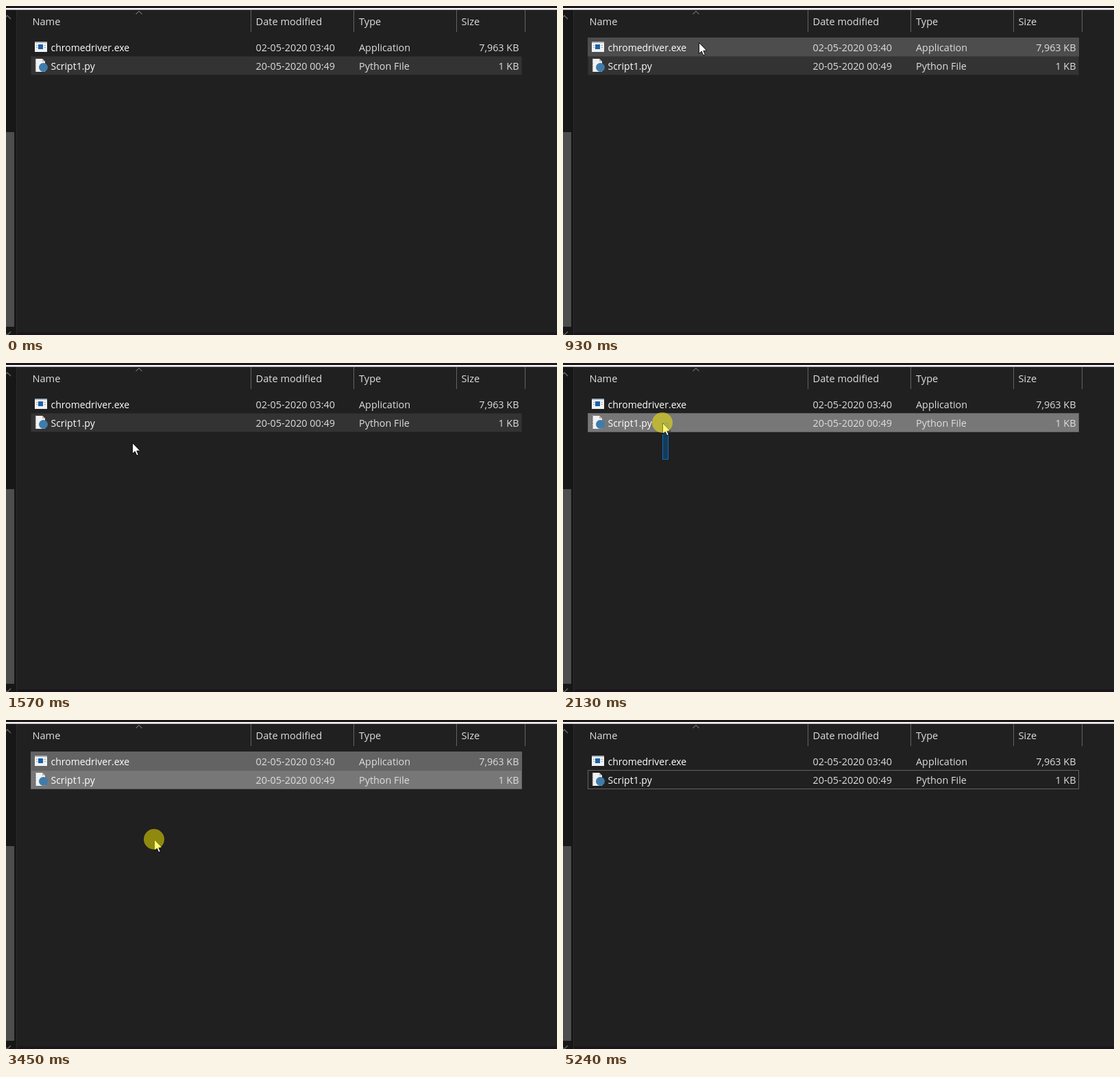
Recreate the animation shown at these times as an HTML page. Size 804 px wide and 480 px high, loop 5660 ms.

```html
<!DOCTYPE html>
<html lang="en">
<head>
<meta charset="utf-8">
<title>File list</title>
<style>
  html, body { margin: 0; width: 100%; height: 100%; overflow: hidden; background: #202020; }
  #stage { position: relative; width: 804px; height: 480px; overflow: hidden; }
  svg { display: block; overflow: visible; }
  text { font: 14.4px "Open Sans", "Noto Sans", sans-serif; fill: #dedede; }
  .head text { font-size: 14.6px; }
  .name { font-size: 14px; fill: #fff; }
  .end { text-anchor: end; }

  .row, .cell, #band, #spot { animation: 5660ms step-end infinite; }
  .row { fill: transparent; stroke: transparent; }
  #row1 { animation-name: row1; }
  #row2 { animation-name: row2; }
  .cell { fill: #434343; animation-name: cell; }

  #band, #pointer { position: absolute; box-sizing: border-box; }
  #pointer { width: 0; height: 0; animation: move 5660ms linear infinite; }
  #band {
    right: 650px; bottom: 339px;
    border: 1px solid #0f6cbd; background: rgba(0, 120, 215, .3);
    animation: move 5660ms linear infinite, drag 5660ms step-end infinite;
  }
  #spot { fill: rgba(255, 242, 0, .5); animation-name: press; }

  /* The pointer; the band shares this path with its far corner fixed. */
  @keyframes move {
    0%      { left: 520px; top: 490px; }
    4.594%  { left: 520px; top: 490px; animation-timing-function: steps(10); }
    13.251% { left: 205px; top: 0; animation-timing-function: steps(2); }
    14.664% { left: 192px; top: 6px; animation-timing-function: steps(2); }
    16.431% { left: 198px; top: 53px; animation-timing-function: steps(6); }
    21.378% { left: 208px; top: 88px; animation-timing-function: steps(5); }
    25.442% { left: 193px; top: 109px; animation-timing-function: steps(9); }
    32.686% { left: 153px; top: 141px; }
    33.569% { left: 153px; top: 141px; animation-timing-function: steps(3); }
    36.042% { left: 146px; top: 111px; animation-timing-function: steps(2); }
    37.633% { left: 145px; top: 87px; animation-timing-function: steps(8); }
    43.993% { left: 148px; top: 52px; }
    46.466% { left: 148px; top: 52px; animation-timing-function: steps(12); }
    56.89%  { left: 216px; top: 174px; }
    65.901% { left: 216px; top: 174px; animation-timing-function: steps(12); }
    75.795% { left: 100px; top: 87px; }
    76.678% { left: 100px; top: 87px; animation-timing-function: steps(13); }
    87.279% { left: 701px; top: 438px; animation-timing-function: steps(6); }
    92.58%, 100% { left: 722px; top: 484px; }
  }
  @keyframes drag {
    0%, 47.35%, 100% { visibility: hidden; }
    33.569% { visibility: visible; }
  }
  @keyframes press {
    0%, 47.35%, 61.837%, 100% { visibility: hidden; }
    33.569%, 57.774% { visibility: visible; }
  }
  @keyframes cell {
    0%, 16.431%, 100% { visibility: hidden; }
    15.548% { visibility: visible; }
  }
  @keyframes row1 {
    0%, 13.251%, 19.735%, 61.837%, 100% { fill: transparent; stroke: transparent; }
    12.385%, 16.431% { fill: #4d4d4d; stroke: #4d4d4d; }
    40.813% { fill: #777; stroke: #636363; }
    49.064% { fill: #636363; stroke: #636363; }
  }
  @keyframes row2 {
    0%, 12.385%, 24.629%, 100% { fill: #333; stroke: transparent; }
    11.52%, 19.735%, 36.749%, 49.064% { fill: #777; stroke: #636363; }
    40.813% { fill: #636363; stroke: #636363; }
    61.837%, 77.491% { fill: transparent; stroke: #636363; }
    74.965% { fill: #4d4d4d; stroke: #5c5c5c; }
  }
</style>
</head>
<body>
<div id="stage">
  <svg width="804" height="480" viewBox="0 0 804 480">
    <rect width="804" height="480" fill="#202020"/>
    <rect width="15" height="480" fill="#171717"/>
    <rect x="15" width="1" height="480" fill="#2b2b2b"/>
    <rect y="184" width="12" height="284" fill="#4d4d4d"/>
    <path d="M-3 19L2 14L7 19M-3 475L2 480L7 475" fill="none" stroke="#6a6a6a" stroke-width="1.3"/>
    <rect class="cell" x="18" y="6" width="339" height="32"/>
    <rect width="804" height="3" fill="#1d161c"/>
    <rect y="3" width="804" height="2.5" fill="#fff"/>
    <rect y="476" x="16" width="788" height="4" fill="#1c161c"/>
    <path d="M357.5 6V38M507.5 6V38M657.5 6V38M757.5 6V38" stroke="#636363"/>
    <path d="M189.5 12L194 7.5L198.5 12" fill="none" stroke="#9a9a9a"/>

    <rect id="row1" class="row" x="36.5" y="46.5" width="716" height="27"/>
    <rect id="row2" class="row" x="36.5" y="73.5" width="716" height="27"/>

    <g class="head">
      <text x="38.5" y="28">Name</text>
      <text x="364.5" y="28">Date modified</text>
      <text x="515" y="28">Type</text>
      <text x="664.5" y="28">Size</text>
    </g>
    <g>
      <text class="name" x="65.5" y="66">chromedriver.exe</text>
      <text x="364.5" y="66">02-05-2020 03:40</text>
      <text x="515" y="66">Application</text>
      <text class="end" x="748.5" y="66">7,963 KB</text>
    </g>
    <g>
      <text class="name" x="65.5" y="93">Script1.py</text>
      <text x="364.5" y="93">20-05-2020 00:49</text>
      <text x="515" y="93">Python File</text>
      <text class="end" x="748.5" y="93">1 KB</text>
    </g>

    <g>
      <rect x="42" y="52" width="18" height="15" fill="#f2f2f2"/>
      <rect x="42" y="52" width="18" height="2" fill="#a9b4bf"/>
      <rect x="47" y="56" width="7" height="7" fill="#1a62a8"/>
      <path d="M44 57.5H46M44 60.5H46M55.5 57.5H58M55.5 60.5H58" stroke="#9aa4ae"/>
    </g>
    <g>
      <path d="M43 77H53L57 81V96H43Z" fill="#f2f2f2"/>
      <path d="M53 77V81H57Z" fill="#b9b9b9"/>
      <path d="M43 78V96" stroke="#555" stroke-width="2" stroke-dasharray="1 1.5"/>
      <circle cx="54.5" cy="89.5" r="6.5" fill="#3f7cac"/>
    </g>
  </svg>
  <div id="band"></div>
  <div id="pointer">
    <svg width="1" height="1">
      <path d="M.5 .5V16.5L4.2 13L6.8 19L9.3 18L6.8 12.2H11.8Z" fill="#fff" stroke="#000" stroke-width=".9"/>
      <circle id="spot" r="15"/>
    </svg>
  </div>
</div>
</body>
</html>
```
